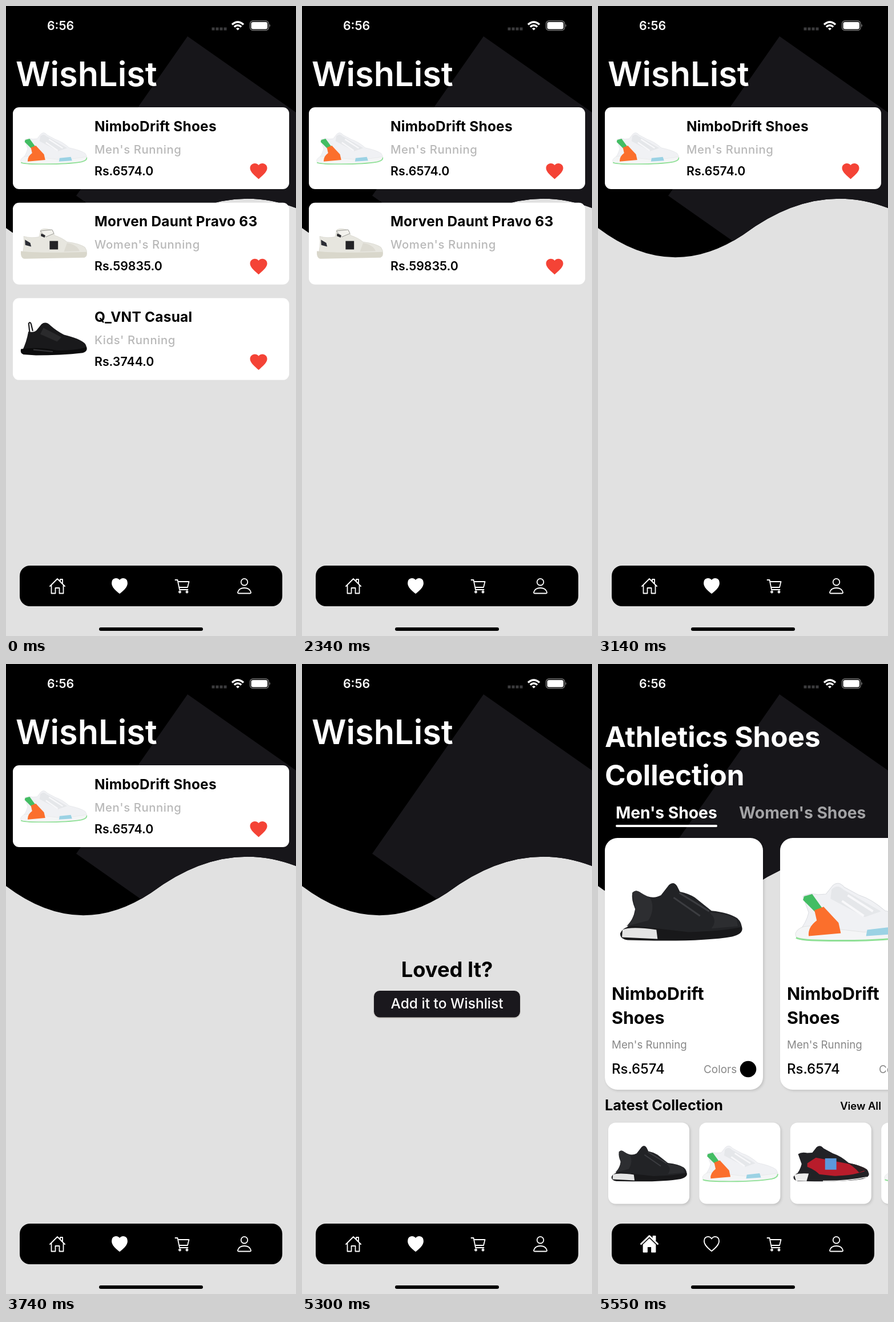
These frames come from a looping animation (508x1101 px, 6340 ms). An HTML page:

```html
<!DOCTYPE html>
<html lang="en">
<head>
<meta charset="utf-8">
<title>Shoe shop wishlist</title>
<style>
  html, body { margin: 0; width: 100%; height: 100%; overflow: hidden; background: #e1e1e1; }
  svg { display: block; width: 100%; height: 100%; }
  text { font-family: Inter, "Open Sans", sans-serif; white-space: pre; }
  .b { font-weight: 700; }
  .s { font-weight: 600; }
  .m { font-weight: 500; }
  .line { fill: none; stroke: #fff; stroke-width: 1.8; stroke-linecap: round; stroke-linejoin: round; }
  .card { fill: #fff; filter: drop-shadow(2px 2px 2px #0002); }
</style>
</head>
<body>
<svg viewBox="0 0 508 1101" preserveAspectRatio="none">
  <defs>
    <path id="heart" d="M12 21.35l-1.45-1.32C5.4 15.36 2 12.28 2 8.5 2 5.42 4.42 3 7.5 3c1.74 0 3.41.81 4.5 2.09C13.09 3.81 14.76 3 16.5 3 19.58 3 22 5.42 22 8.5c0 3.78-3.4 6.86-8.55 11.54z"/>
    <path id="navHeart" d="M199 1026C194 1022 186 1016 186 1008.5C186 1000 195 998.5 199 1004.5C203 998.5 212 1000 212 1008.5C212 1016 204 1022 199 1026Z"/>
    <clipPath id="header"><path id="wave" d="M0 0V388Q127 484 254 400Q381 304.5 508 353V0Z"/></clipPath>

    <path id="sole" d="M1 88Q8 74 30 76L120 86Q180 85 213 77Q217 89 196 94Q150 102 60 101L14 100Q0 98 1 88Z"/>
    <path id="upper" d="M22 18Q28 11 37 18Q56 31 72 22L86 4Q94-3 100 6L105 16Q120 19 131 26L160 49Q190 52 205 62Q214 70 213 82Q170 92 120 92L8 84Q24 66 27 46Q20 30 22 18Z"/>
    <path id="lowUpper" d="M14 24Q24 17 40 21L54 20L66 5Q76-4 86 8L112 22Q134 29 157 49Q194 57 208 67Q214 74 213 84Q170 92 120 92L6 86Q20 70 24 52Z"/>

    <g id="black">
      <use href="#upper" fill="#222326"/>
      <path d="M22 18Q28 11 37 18L54 28Q62 46 50 66L12 76Q28 58 27 46Z" fill="#2d2e31"/>
      <path d="M104 18L156 50M94 26L140 58" stroke="#3c3d41" stroke-width="3" fill="none"/>
      <path d="M156 52Q190 54 204 64L206 76L160 80Q172 64 156 52Z" fill="#2c2d30"/>
      <use href="#sole" fill="#18181a"/>
      <path d="M5 82Q20 76 64 82L66 98L4 95Z" fill="#e4e4e4"/>
    </g>

    <g id="white">
      <use href="#lowUpper" fill="#f0f1f4" stroke="#dcdee2"/>
      <path d="M64 12Q74 2 84 12L150 50L122 60L62 28Z" fill="#e5e7ea"/>
      <path d="M92 22L136 50M82 32L120 58" stroke="#f8f8fa" stroke-width="4"/>
      <use href="#sole" fill="#f4f5f6" stroke="#e2e4e4"/>
      <path d="M2 96Q12 101 60 101Q150 102 196 94Q214 90 213 80" fill="none" stroke="#8fe096" stroke-width="3"/>
      <path d="M16 24L30 20L48 45L36 52L14 30Z" fill="#43bd63"/>
      <path d="M34 48L50 42L76 70L80 88L24 93Q22 78 38 66Z" fill="#fb6f2c"/>
      <path d="M126 82L162 78L166 90L124 93Z" fill="#9bd2e4"/>
    </g>

    <g id="strap">
      <path d="M11 25Q34 32 60 27L66 4Q80-3 104 6L110 22Q134 30 150 43Q190 48 207 60Q215 70 213 82L5 86Q15 58 11 25Z" fill="#e7e6df" stroke="#cfcdc4"/>
      <path d="M64 8L102 4L108 16L82 27Z" fill="#f3f2ed" stroke="#8c8c88" stroke-width="1.5"/>
      <path d="M67 16L80 22L78 29L66 24Z" fill="#292a2e"/>
      <path d="M15 36L32 46L35 58L16 53Z" fill="#2b2d35"/>
      <rect x="94" y="40" width="27" height="27" fill="#232326"/>
      <path d="M150 46Q182 52 190 72L140 74Z" fill="#dcdad1"/>
      <path d="M2 72Q60 80 212 75Q217 88 206 93L14 97Q0 95 2 72Z" fill="#d9d7cb"/>
    </g>

    <g id="sock">
      <path d="M30 32L27 4Q32-3 35 7L40 28" fill="none" stroke="#1b1b1d" stroke-width="4"/>
      <path d="M26 30Q44 34 52 26L68 6Q82-4 96 10Q116 28 140 40Q190 52 207 68Q214 76 212 90L120 98L6 92Q20 64 26 30Z" fill="#19191b"/>
      <path d="M74 18L132 48L118 62L64 38Z" fill="#2a2a2c"/>
      <path d="M2 86Q60 78 116 90Q170 92 213 80Q216 94 200 98Q130 106 50 106L10 103Q-1 100 2 86Z" fill="#0c0c0d"/>
      <path d="M42 88L104 94" stroke="#343437" stroke-width="4"/>
    </g>

    <g id="red">
      <use href="#lowUpper" fill="#222226"/>
      <path d="M40 50L64 34L148 50Q188 58 202 72Q160 88 78 86Q66 70 40 60Z" fill="#b81c2b"/>
      <path d="M150 48Q194 57 208 68L186 76Q168 56 150 48Z" fill="#2a2023"/>
      <rect x="90" y="36" width="32" height="32" fill="#5b98dc"/>
      <use href="#sole" fill="#222225"/>
      <path d="M3 82Q20 77 44 79L38 100L8 99Z" fill="#ededed"/>
      <path d="M84 100Q150 101 208 89" fill="none" stroke="#e8e8e8" stroke-width="3"/>
    </g>
  </defs>

  <rect width="508" height="1101" fill="#e1e1e1"/>
  <use href="#wave"/>
  <g clip-path="url(#header)">
    <rect width="340" height="340" transform="translate(318 53) rotate(35)" fill="#17161a"/>
  </g>

  <!-- status bar -->
  <text class="s" x="72" y="42" font-size="21.3" fill="#fff">6:56</text>
  <path d="M360.5 40h26" stroke="#3c3c3e" stroke-width="5" stroke-dasharray="5 2"/>
  <g fill="none" stroke="#fff" stroke-width="3.4">
    <path d="M396 32.5Q406 23.5 416 32.5M399.8 36.5Q406 31 412.2 36.5"/>
    <path d="M403 39.5Q406 36.5 409 39.5L406 42.5Z" fill="#fff" stroke="none"/>
  </g>
  <rect x="427.5" y="26" width="32.5" height="16.5" rx="5" fill="none" stroke="#777" stroke-width="1.4"/>
  <rect x="429.5" y="28" width="28.5" height="12.5" rx="3.3" fill="#fff"/>
  <path d="M461.5 31.5q3 2.7 0 5.5z" fill="#777"/>

  <g id="wishlist">
    <text class="s" x="17" y="140" font-size="59.4" fill="#fff">WishList</text>
    <g id="items"></g>
    <g id="empty" text-anchor="middle">
      <text class="b" x="254" y="547" font-size="36.3">Loved It?</text>
      <rect x="126" y="571" width="256" height="46.5" rx="10" fill="#1a181d" style="filter:drop-shadow(0 1.5px 1px #7656)"/>
      <text class="m" x="254" y="602" font-size="24.5" fill="#fff">Add it to Wishlist</text>
    </g>
  </g>

  <g id="home">
    <g class="b" fill="#fff">
      <text x="12" y="145" font-size="49.4">Athletics Shoes</text>
      <text x="12" y="212" font-size="49.4">Collection</text>
      <text x="31" y="270" font-size="28.2">Men's Shoes</text>
      <text x="247" y="270" font-size="28.2" fill="#a3a3a5">Women's Shoes</text>
    </g>
    <rect x="31" y="281" width="178" height="4" rx="2" fill="#fff"/>
    <g id="products"></g>
    <text class="b" x="12" y="780" font-size="25.2">Latest Collection</text>
    <text class="s" x="496" y="779" font-size="18.4" text-anchor="end">View All</text>
    <g id="latest"></g>
  </g>

  <!-- navigation -->
  <rect x="24" y="978" width="460" height="71" rx="18"/>
  <g class="line">
    <path id="homeOutline" d="M77 1014L90 1001L103 1014M79.5 1012V1026.5H86.5V1017H93.5V1026.5H100.5V1012M95 1005V1002H99V1009"/>
    <g id="homeSolid">
      <path d="M75.5 1013.5L90 999.5L104.5 1013.5" stroke-width="3"/>
      <path d="M96.5 1003V1000H100.5V1007Z" fill="#fff"/>
      <path d="M79.500 1015L90 1005L100.5 1015V1027.5H94V1018H86V1027.5H79.5Z" fill="#fff"/>
    </g>
    <use id="favourite" href="#navHeart"/>
    <path d="M296.5 1003H300.5L304 1020H318.5M301 1006H320.5L318 1016H303.2"/>
    <circle cx="304.5" cy="1024" r="1.5"/><circle cx="317" cy="1024" r="1.5"/>
    <circle cx="417.5" cy="1006.7" r="5.8"/>
    <path d="M407.5 1026.500Q405.500 1026.500 406.200 1024Q408.500 1017 417.500 1017Q426.500 1017 428.800 1024Q429.500 1026.500 427.500 1026.500Z"/>
  </g>
  <rect x="163" y="1086" width="182" height="6" rx="3"/>
</svg>

<script>
const LOOP = 6340;
const HOME_AT = 5370;
const byId = id => document.getElementById(id);
const shoe = (kind, x, y, width) =>
  `<use href="#${kind}" transform="translate(${x} ${y}) scale(${width / 214})"/>`;

const wishes = [
  { name: "NimboDrift Shoes", group: "Men's Running", price: "6574.0", kind: "white", top: 44, removedAt: 3990 },
  { name: "Morven Daunt Pravo 63", group: "Women's Running", price: "59835.0", kind: "strap", top: 45, removedAt: 3140 },
  { name: "Q_VNT Casual", group: "Kids' Running", price: "3744.0", kind: "sock", top: 42, removedAt: 2340 },
];

byId("items").innerHTML = wishes.map((w, i) => `
  <g transform="translate(12 ${177 + i * 166.8})">
    <rect width="484" height="143" rx="11" fill="#fff"/>
    ${shoe(w.kind, 13, w.top, 117)}
    <text class="b" x="143" y="41.5" font-size="24.4" letter-spacing=".25">${w.name}</text>
    <text class="m" x="143" y="80.5" font-size="20.3" letter-spacing=".6" fill="#b9b9b9">${w.group}</text>
    <text class="s" x="143" y="118.5" font-size="21.3">Rs.${w.price}</text>
    <use href="#heart" transform="translate(412.5 93.5) scale(1.5)" fill="#f44336"/>
  </g>`).join("");

byId("products").innerHTML = ["black", "white"].map((kind, i) => `
  <g transform="translate(${12 + i * 307} 304)">
    <rect class="card" width="277" height="440" rx="22"/>
    ${shoe(kind, 26, 78, 215)}
    <text class="b" x="12" y="283" font-size="30.4">NimboDrift</text>
    <text class="b" x="12" y="325" font-size="30.4">Shoes</text>
    <text x="12" y="368" font-size="18.7" fill="#888">Men's Running</text>
    <text class="m" x="12" y="412" font-size="24">Rs.6574</text>
    <text x="173" y="411" font-size="18.9" fill="#888">Colors</text>
    <circle cx="251" cy="404" r="14.3"/>
  </g>`).join("");

byId("latest").innerHTML = ["black", "white", "red", "white"].map((kind, i) => `
  <g transform="translate(${18 + i * 159.4} 801.5)">
    <rect class="card" width="142" height="142" rx="13"/>
    ${shoe(kind, 5, 40, 133)}
  </g>`).join("");

const show = (el, visible) => { el.style.display = visible ? "" : "none"; };

function draw(now) {
  const t = now % LOOP;
  const atHome = t >= HOME_AT;
  wishes.forEach((w, i) => show(byId("items").children[i], t < w.removedAt));
  show(byId("empty"), t >= wishes[0].removedAt);
  show(byId("wishlist"), !atHome);
  show(byId("home"), atHome);
  show(byId("homeSolid"), atHome);
  show(byId("homeOutline"), !atHome);
  byId("favourite").style.fill = atHome ? "none" : "#fff";
}

const start = performance.now();
function tick() {
  draw(performance.now() - start);
  requestAnimationFrame(tick);
}
tick();
</script>
</body>
</html>
```
